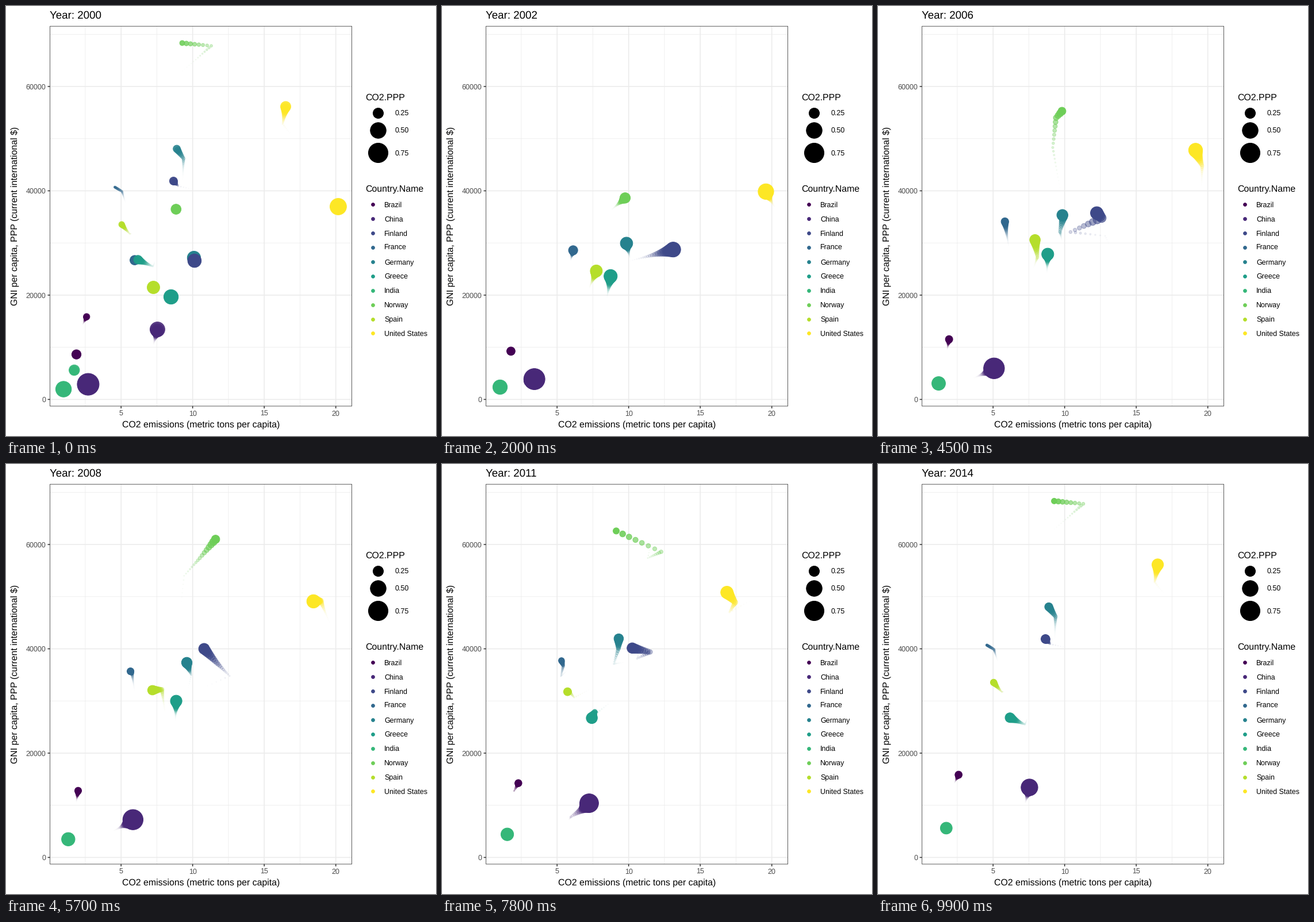
A matplotlib script that plays this animation: 748x748 px, repeating every 10000 ms.

```python
import numpy as np
import matplotlib.pyplot as plt
from matplotlib.animation import FuncAnimation
from matplotlib.patches import Rectangle

W = H = 748
DPI = 100
PT = 72 / DPI          # points per pixel
FRAMES, WAKE = 100, 25
STROKE = 1.02          # marker outline, px

plt.rcParams["font.family"] = "Liberation Sans"
plt.rcParams["path.snap"] = False
plt.rcParams["text.hinting"] = "none"

# Turning points: years after 2000, CO2 (t per capita), GNI (thousand $)
PATHS = {
    "Brazil": [(0, 1.88, 8.63), (3, 1.77, 9.29), (8, 2.0, 12.8), (14, 2.59, 15.86)],
    "China": [(0, 2.7, 2.9), (2, 3.01, 3.51), (11, 7.24, 10.4), (14, 7.54, 13.43)],
    "France": [(0, 5.95, 26.7), (3, 6.13, 28.7), (7, 5.77, 35.2), (10, 5.43, 36.7),
               (13, 5.06, 39.9), (14, 4.57, 40.7)],
    "Germany": [(0, 10.09, 27.15), (5, 9.67, 32.2), (6, 9.9, 34.9), (10, 9.28, 40),
                (13, 9.36, 46.2), (14, 8.89, 48.05)],
    "Finland": [(0, 10.13, 26.6), (3, 13.26, 28.85), (4, 12.83, 31.35), (5, 10.41, 32.1),
                (6, 12.58, 34.8), (8, 10.8, 40), (10, 11.5, 39.4), (12, 9, 40.9), (14, 8.66, 41.88)],
    "Greece": [(0, 8.49, 19.66), (3, 8.75, 23.85), (8, 8.85, 30), (10, 7.63, 28),
               (12, 7.22, 25.5), (14, 6.18, 26.8)],
    "India": [(0, 0.98, 1.97), (4, 1.03, 2.54), (14, 1.73, 5.62)],
    "Norway": [(0, 8.84, 36.47), (3, 9.8, 38.75), (5, 9.17, 48.3), (6, 9.4, 54),
               (8, 11.6, 61), (10, 12.27, 58.6), (11, 9.13, 62.6), (13, 11.3, 67.8), (14, 9.27, 68.33)],
    "Spain": [(0, 7.26, 21.48), (5, 8.1, 27.3), (7, 7.85, 32.2), (10, 5.86, 31.8),
              (12, 5.6, 31.75), (14, 5.04, 33.55)],
    "United States": [(0, 20.17, 36.97), (3, 19.56, 40), (5, 19.6, 44.8), (7, 18.94, 49.2),
                      (10, 17.44, 48.9), (12, 16.29, 52.8), (14, 16.5, 56.15)],
}
NAMES = sorted(PATHS)
COLORS = dict(zip(NAMES, plt.cm.viridis(np.linspace(0, 1, len(NAMES)))))

YEARS = np.arange(15)
SLUMP = np.maximum(0, 1 - abs(YEARS - 9))   # shared dip in 2009


def yearly(path):
    """CO2 runs in straight lines, income grows at compound rates."""
    t, co2, gni = np.transpose(path)
    x = np.interp(YEARS, t, co2) * (1 - 0.05 * SLUMP)
    y = np.exp(np.interp(YEARS, t, np.log(gni))) * (1 - 0.04 * SLUMP)
    return x, y


CO2, GNI = np.stack([yearly(p) for p in PATHS.values()], axis=1)
RATIO = CO2 / GNI
LO, HI = RATIO.min(), RATIO.max()


def px(x):
    return 200.2 + 24.9 * (x - 5)


def py(y):
    return 684.4 - 9.073 * y


def point_size(ratio):
    """Area scale onto sizes 1 to 12."""
    return 1 + 11 * np.sqrt((ratio - LO) / (HI - LO))


def area(size):
    """Scatter area for a point size."""
    radius = 0.51 + 1.54 * size
    return (2 * radius * PT) ** 2


def tween(rows):
    """Straight motion between yearly stops, each on a whole frame."""
    stops = np.round((FRAMES - 1) * YEARS / YEARS[-1])
    return np.array([np.interp(np.arange(FRAMES), stops, r) for r in rows])


X, Y, S = tween(px(CO2)), tween(py(GNI)), tween(point_size(RATIO))

fig = plt.figure(figsize=(W / DPI, H / DPI), dpi=DPI, facecolor="white")
ax = fig.add_axes([0, 0, 1, 1])
ax.set_xlim(0, W)
ax.set_ylim(H, 0)
ax.axis("off")

LEFT, RIGHT, TOP, BOTTOM = 76.5, 601.6, 35.2, 696
BIG, MID, SMALL = 18.8, 15.95, 12.5
GRID, DARK, GREY = "#ebebeb", "#333333", "#4d4d4d"


def line(xs, ys, color, width, z):
    ax.plot(xs, ys, color=color, lw=width * PT, zorder=z, solid_capstyle="butt")


def text(x, y, s, size, color="black", **kw):
    return ax.text(x, y, s, fontsize=size * PT, color=color, **kw)


def dot(x, y, size, color):
    ax.scatter([x], [y], s=area(size), color=[color], linewidths=STROKE * PT, zorder=5)


# Grid and axes
for x in (2.5, 7.5, 12.5, 17.5):
    line([px(x)] * 2, [TOP, BOTTOM], GRID, 0.77, 1)
for y in (10, 30, 50, 70):
    line([LEFT, RIGHT], [py(y)] * 2, GRID, 0.77, 1)
for x in (5, 10, 15, 20):
    line([px(x)] * 2, [TOP, BOTTOM], GRID, 1.54, 2)
    line([px(x)] * 2, [BOTTOM, BOTTOM + 4], DARK, 1.54, 2)
    text(px(x), 713.2, str(x), SMALL, GREY, ha="center")
for y in (0, 20, 40, 60):
    line([LEFT, RIGHT], [py(y)] * 2, GRID, 1.54, 2)
    line([LEFT - 4, LEFT], [py(y)] * 2, DARK, 1.54, 2)
    text(69.6, py(y) + 4.5, str(y * 1000), SMALL, GREY, ha="right")
ax.add_patch(Rectangle((LEFT, TOP), RIGHT - LEFT, BOTTOM - TOP, fill=False,
                       ec=DARK, lw=0.8 * PT, zorder=6))

text(338.9, 732.6, "CO2 emissions (metric tons per capita)", MID, ha="center")
text(20.6, 365.4, "GNI per capita, PPP (current international $)", MID,
     rotation=90, ha="center", va="baseline", rotation_mode="anchor")
title = text(76.3, 21.8, "", BIG)

# Legends
text(625.3, 163.4, "CO2.PPP", MID)
for ratio, y in ((0.25, 185.6), (0.5, 215.5), (0.75, 255.2)):
    dot(647.2, y, point_size(ratio), "black")
    text(677, y + 4.5, f"{ratio:.2f}", SMALL)
text(625.3, 322.6, "Country.Name", MID)
for k, name in enumerate(NAMES):
    y = 345 + 24.94 * k
    dot(637.9, y, 1.5, COLORS[name])
    text(658, y + 4.5, name, SMALL)

points = ax.scatter([], [], linewidths=STROKE * PT, zorder=4)

# Each wake fades and shrinks with age, oldest first
lags = np.arange(WAKE - 1, -1, -1)
fade = (1 - lags / WAKE) ** 3
rgba = np.repeat([COLORS[n] for n in PATHS], WAKE, axis=0)
rgba[:, 3] = np.tile(fade, len(PATHS))


def update(i):
    idx = (i - lags) % FRAMES
    points.set_offsets(np.column_stack([X[:, idx].ravel(), Y[:, idx].ravel()]))
    points.set_sizes(area(S[:, idx] * fade).ravel())
    points.set_facecolor(rgba)
    points.set_edgecolor(rgba)
    title.set_text(f"Year: {2000 + 14 * i // (FRAMES - 1)}")
    return points, title


anim = FuncAnimation(fig, update, frames=FRAMES, interval=100,
                     init_func=lambda: update(0), repeat=True, repeat_delay=0)
plt.show()
```
